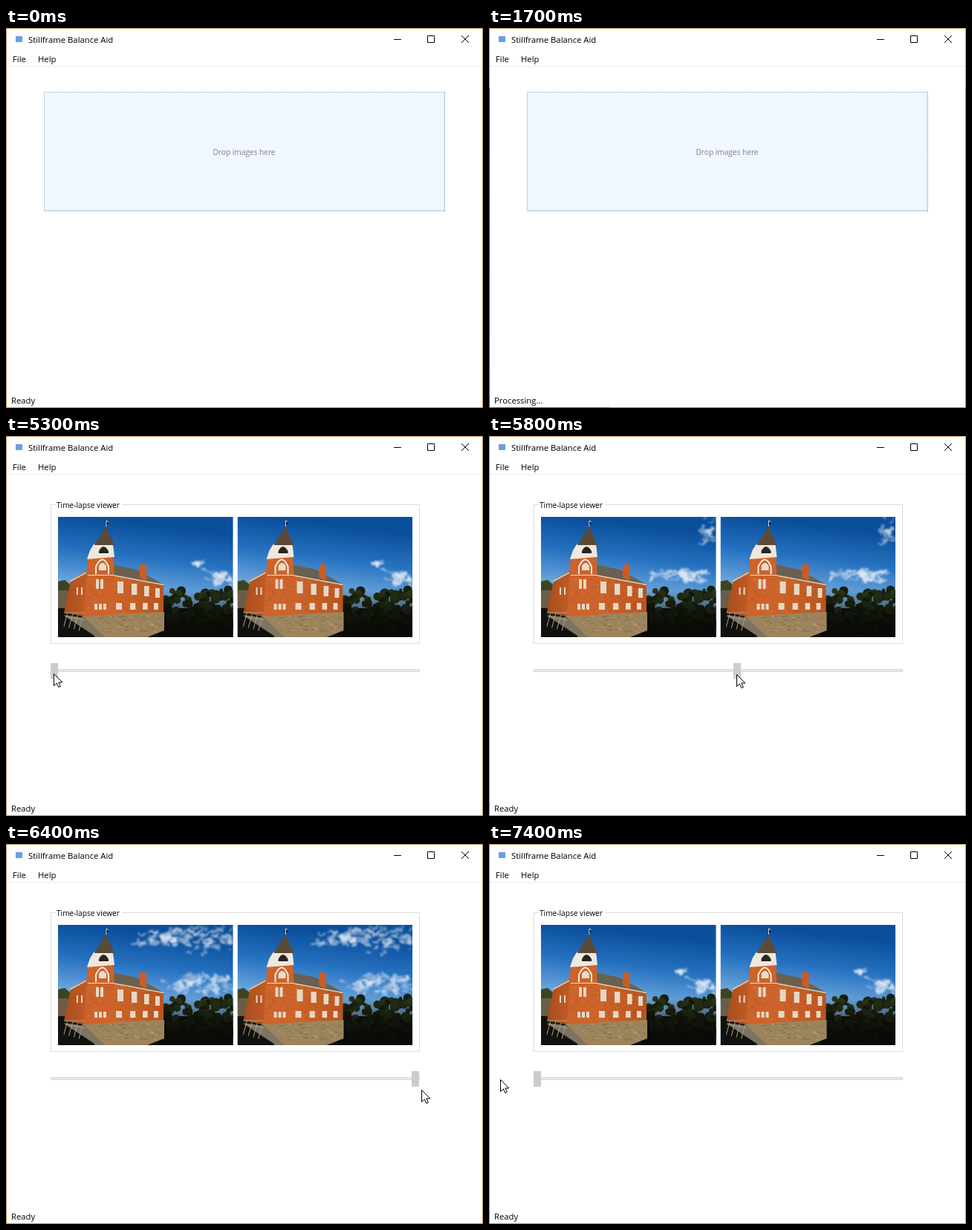
These frames come from a looping animation (642 px wide and 512 px high, 9400 ms). An HTML page:

```html
<!DOCTYPE html>
<html lang="en">
<head>
<meta charset="utf-8">
<title>Stillframe Balance Aid</title>
<style>
  html, body { margin: 0; width: 100%; height: 100%; overflow: hidden; background: #fff; }
  svg { display: block; }
  text { font: 11.3px "Open Sans", sans-serif; }
  .small { font-size: 10.15px; }
  .line { fill: none; stroke: #000; }
</style>
</head>
<body>
<svg width="642" height="512" viewBox="0 0 642 512">
  <defs>
    <linearGradient id="sky" x1=".1" x2="0" y1="0" y2=".6">
      <stop offset="0" stop-color="#0a4f9c"/>
      <stop offset=".45" stop-color="#2672c0"/>
      <stop offset="1" stop-color="#7db2e4"/>
    </linearGradient>
    <linearGradient id="brick" x2="1">
      <stop offset="0" stop-color="#a94c1c"/>
      <stop offset=".4" stop-color="#d0682c"/>
      <stop offset="1" stop-color="#bb5520"/>
    </linearGradient>
    <linearGradient id="shade" x2="0" y2="1">
      <stop offset="0" stop-color="#080906" stop-opacity="0"/>
      <stop offset=".75" stop-color="#080906" stop-opacity=".9"/>
    </linearGradient>
    <linearGradient id="desk" x2="0" y2="1">
      <stop offset="0" stop-color="#174a86"/>
      <stop offset="1" stop-color="#3c6470"/>
    </linearGradient>
    <filter id="wisp" filterUnits="userSpaceOnUse" x="60" y="99" width="260" height="182" color-interpolation-filters="sRGB">
      <feTurbulence type="fractalNoise" baseFrequency=".1" numOctaves="3" seed="4"/>
      <feDisplacementMap in="SourceGraphic" scale="14" xChannelSelector="R" yChannelSelector="G"/>
      <feGaussianBlur stdDeviation=".9"/>
    </filter>
    <clipPath id="crop"><path d="M70 109H305.5V271H70z"/></clipPath>
  </defs>

  <path fill="#fff" d="M0 0H642V512H0z"/>
  <path fill="#6a9fe4" d="M13 11h9v8h-9z"/>
  <text x="30" y="20">Stillframe Balance Aid</text>
  <path class="line" d="M522 15.5H532M567.5 10.5h9v9h-9zM613 10l10 10M623 10l-10 10"/>
  <text x="9" y="46">File</text>
  <text x="43" y="46">Help</text>
  <path stroke="#ececec" d="M1 51.5H641"/>
  <text id="status" x="7" y="506"></text>

  <g id="dropZone">
    <path fill="#f0f7ff" d="M51 86H591V247H51z"/>
    <g fill="none" stroke-dasharray="1 1">
      <path stroke="#8eacc4" d="M51 86.5H591M51.5 86V247M51 246.5H591M590.5 86V247"/>
      <path stroke="#c4d6e4" d="M52 245.5H591M589.5 87V247"/>
    </g>
    <text class="small" x="320.5" y="171" text-anchor="middle" fill="#808080">Drop images here</text>
  </g>

  <g id="viewer">
    <path fill="none" stroke="#dcdcdc" d="M60.5 92.5H556.5V279.5H60.5z"/>
    <path fill="#fff" d="M67 90H156V95H67z"/>
    <text class="small" x="68" y="97">Time-lapse viewer</text>
    <g id="photo" clip-path="url(#crop)">
      <path fill="url(#sky)" d="M70 109H306V271H70z"/>
      <g id="clouds" fill="#eaf0f7" filter="url(#wisp)"></g>
      <path fill="#3c4422" d="M70 196l9-2 7 6v12H70z"/>
      <path fill="#6a5d48" d="M70 208h15v30H70z"/>
      <path fill="#11110d" d="M70 232H306V271H70z"/>
      <g id="trees"></g>
      <path fill="url(#shade)" d="M205 208H306V271H205z"/>
      <!-- main building -->
      <path fill="url(#brick)" d="M108 182L146 184L212 201V240L105 243L78 238L87 195z"/>
      <path fill="#9b845d" d="M103 242L213 237V262L190 271H120z"/>
      <path fill="#6a6050" d="M143 173L176 180L212 200L146 188z"/>
      <path fill="none" stroke="#ded0ba" stroke-width="1.500" d="M146 188L212 200.500M86 196L108 184"/>
      <path fill="#cb5c25" d="M180 173h9v21l-9-3z"/>
      <!-- tower -->
      <path fill="#cc632b" d="M110 163H145L147 241L105 243z"/>
      <path fill="#eee8de" d="M118 146H144L146 163L109 166L113 154z"/>
      <path fill="#5b4b36" d="M134.500 122L146 147L119 147z"/>
      <path fill="#2b251f" d="M125 158V155q6-12 13 0v3z"/>
      <path fill="none" stroke="#f4ece0" stroke-width="2" d="M121 186V176q9-19 17 0v10"/>
      <path fill="#e9dccb" d="M125 181V175q5-8 10 0v6z"/>
      <path stroke="#e9dccb" d="M110 187.500H146M135 122V114l3 2"/>
      <g id="texture"></g>
      <path id="glass" fill="#e6d8c4"/>
      <!-- railing -->
      <path fill="#7d7363" d="M78 241L106 245L133 271H122L84 246z"/>
      <path fill="none" stroke="#a99d87" d="M78 238H106M79 243L106 248"/>
      <path stroke="#a99d87" stroke-width="20" stroke-dasharray="1 6" d="M80 247L106 254"/>
    </g>
    <use href="#photo" x="241.500"/>
    <path fill="#e7eaea" stroke="#d6d8da" d="M60.500 314.500H556.500V317.500H60.500z"/>
    <path id="handle" d="M0 306h10v21H0z"/>
  </g>

  <path id="cursor" class="line" style="fill:#fff" d="M.5.5V16.500L4.300 13L6.800 18.500L9.300 17.400L6.900 12H11.800z"/>

  <path fill="none" stroke="#bd8f5b" d="M.5 512V.5H641.500V512"/>
  <path stroke="#a69252" d="M0 511.500H642"/>
  <g id="inactive">
    <path fill="url(#desk)" d="M0 81h1v431H0z"/>
    <path fill="#6f8789" d="M641 81h1v431h-1zM162 511h480v1H162z"/>
    <path fill="#3c6470" d="M0 511h162v1H0z"/>
  </g>
</svg>

<script>
const LOOP = 9400;
const $ = id => document.getElementById(id);
const clamp = (n, low, high) => Math.max(low, Math.min(high, n));

let seed = 7;
const random = () => (seed = seed * 16807 % 2147483647) / 2147483647;
const between = (low, high) => low + random() * (high - low);
const spread = size => (random() + random() - 1) * size;

function add(parent, tag, attributes = {}) {
  const node = document.createElementNS('http://www.w3.org/2000/svg', tag);
  for (const [name, value] of Object.entries(attributes)) node.setAttribute(name, value);
  return parent.appendChild(node);
}

function addTrees() {
  for (let y = 207; y < 262; y += .4)
    add($('trees'), 'circle', {
      cx: between(213, 307), cy: y + between(0, 4), r: between(2, 7),
      fill: `hsl(${between(75, 100)} ${between(30, 48)}% ${between(6, 16)}%)`
    });
}

// Fine light and dark marks that give brick and stone their grain
function addGrain(count, left, top, right, bottom, opacity) {
  for (let i = 0; i < count; i++)
    add($('texture'), 'rect', {
      x: between(left, right), y: between(top, bottom), width: between(2, 5), height: 1,
      fill: i % 2 ? '#4a2c12' : '#f3c48c', opacity
    });
}

// Windows shrink and crowd together towards the far end of the wall
function windowPath() {
  const pane = (x, y, w, h) => `M${x} ${y}h${w}v${h}h${-w}z`;
  let d = '';
  for (let i = 0; i < 4; i++) {
    const x = 150 + 20 * i - i * i, w = 8 - i * .7;
    d += pane(x, 196 + 3 * i, w, 16 - i) + pane(x - 2, 225, w, 9);
  }
  for (let i = 0; i < 3; i++) d += pane(119 + 6 * i, 226, 4, 8);
  for (let i = 0; i < 2; i++) d += pane(121 + 6 * i, 193, 4, 13) + pane(95 + 6 * i, 204, 2, 10);
  return d;
}

// Clouds: slider position where they are clearest, centre, half width, half height
const clouds = [
  [0, 287, 191, 24, 10], [0, 259, 172, 8, 4],
  [.55, 295, 128, 13, 19], [.55, 258, 188, 48, 9],
  [1, 215, 126, 40, 14], [1, 273, 128, 38, 19], [1, 258, 188, 54, 15]
].map(([peak, x, y, w, h]) => {
  const node = add($('clouds'), 'g');
  for (let i = 0; i < w * 1.5; i++)
    add(node, 'ellipse', { cx: x + spread(w), cy: y + spread(h), rx: between(2, 6), ry: between(1, 3), opacity: .45 });
  return { peak, node };
});

addTrees();
addGrain(100, 108, 190, 207, 238, .18);
addGrain(90, 122, 242, 207, 264, .3);
$('glass').setAttribute('d', windowPath());

// Pointer path: time, x, y
const path = [
  [3800, 150, 500], [4500, 64, 320], [5500, 64, 320], [5600, 68, 320],
  [5800, 333, 321], [6400, 559, 331], [6600, 573, 330], [7400, 15, 317]
];
function pointerAt(t) {
  const time = clamp(t, path[0][0], path.at(-1)[0]);
  const next = Math.max(1, path.findIndex(key => key[0] >= time));
  const [t0, x0, y0] = path[next - 1], [t1, x1, y1] = path[next];
  const k = (time - t0) / (t1 - t0);
  return [x0 + (x1 - x0) * k, y0 + (y1 - y0) * k].map(Math.round);
}

const show = (id, on) => $(id).setAttribute('visibility', on ? 'visible' : 'hidden');

function draw(t) {
  const loaded = t >= 3700, pressed = t >= 4600;
  show('dropZone', !loaded);
  show('viewer', loaded);
  show('inactive', t >= 200 && !pressed);
  show('cursor', t >= 3800);
  $('status').textContent = t >= 1700 && !loaded ? 'Processing...' : 'Ready';

  const [x, y] = pointerAt(t);
  const left = pressed ? clamp(x - 4, 60, 546) : 60;
  const value = (left - 60) / 486;
  $('cursor').setAttribute('transform', `translate(${x} ${y})`);
  $('handle').setAttribute('transform', `translate(${left})`);
  $('handle').setAttribute('fill', pressed ? '#ccc' : '#0877c6');
  for (const { peak, node } of clouds) {
    node.setAttribute('opacity', clamp(1 - Math.abs(value - peak) / .45, 0, 1));
    node.setAttribute('transform', `translate(${(peak - value) * 70})`);
  }
}

let last = -1;
function tick() {
  const t = Math.floor(performance.now() % LOOP / 100) * 100;
  if (t !== last) draw(last = t);
  requestAnimationFrame(tick);
}
tick();
</script>
</body>
</html>
```
